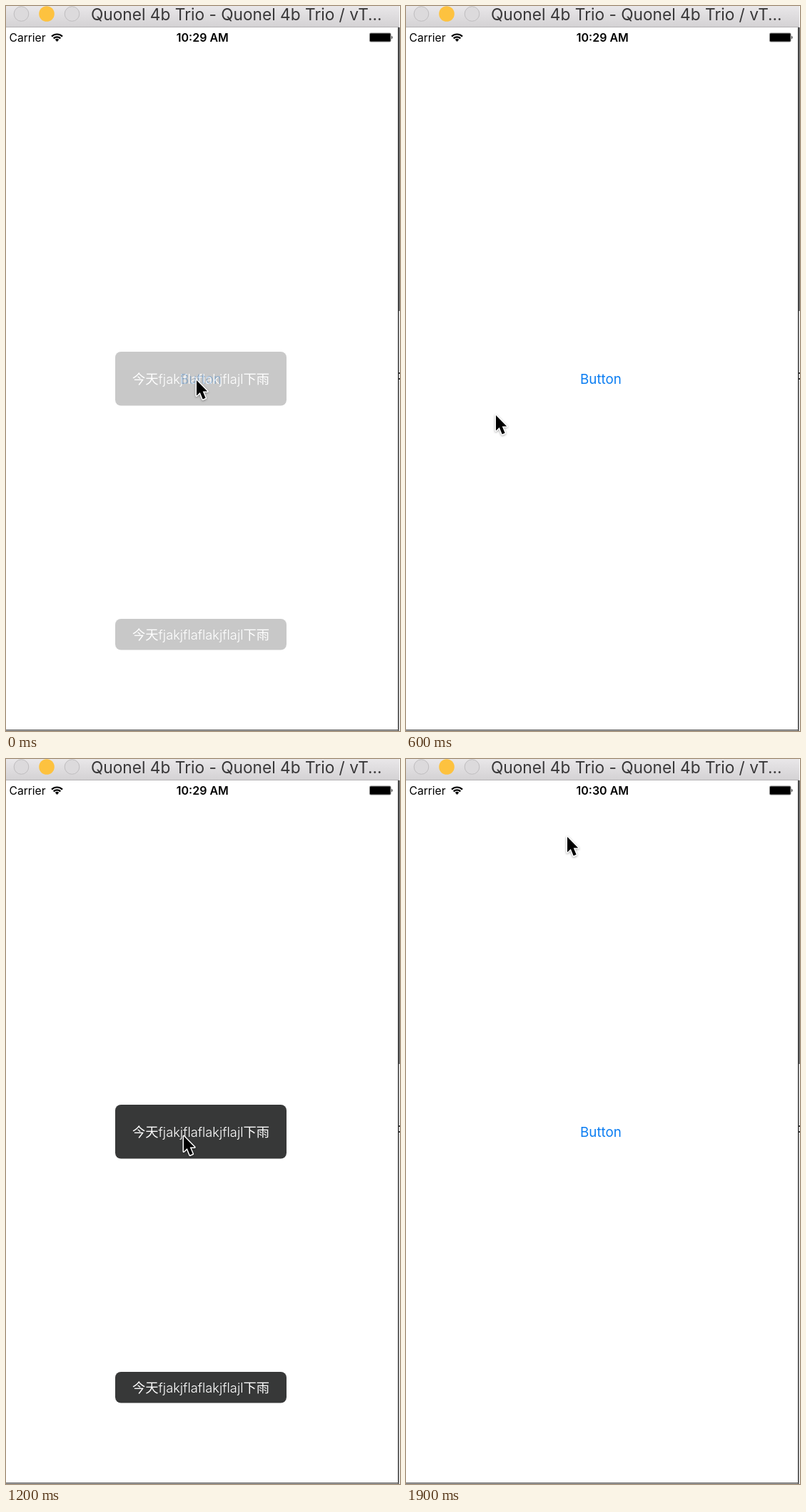
Recreate the animation shown at these times as an HTML page. Size 552 by 1015 pixels, loop 2000 ms.

```html
<!DOCTYPE html>
<html lang="en">
<head>
<meta charset="utf-8">
<style>
  html, body { margin: 0; width: 100%; height: 100%; overflow: hidden; background: #fff; }
  svg { display: block; font-family: Inter, "Noto Sans CJK SC", "Noto Sans CJK", sans-serif; }
  .toast text { fill: #fff; font-size: 18.3px; font-weight: 300; text-anchor: middle; }
  .toast rect { fill: #373838; }
  .light { fill: #dcdadc; stroke: #bfbdbf; }
  #arrow { stroke: #fff; stroke-width: 3; paint-order: stroke; stroke-linejoin: round;
           filter: drop-shadow(0 1.5px 1.5px rgba(0, 0, 0, .35)); }
</style>
</head>
<body>
<svg width="552" height="1015" viewBox="0 0 552 1015">
  <defs>
    <linearGradient id="bar" x2="0" y2="1">
      <stop stop-color="#e9e7e9"/><stop offset="1" stop-color="#d4d2d4"/>
    </linearGradient>
  </defs>

  <!-- window edges -->
  <path fill="#777" d="M550 30h2v397h-2z"/>
  <path fill="#333" d="M549 30h1.5v985h-1.5zM549.5 513h2.5v2h-2.5zM549.5 521h2.5v2h-2.5z"/>
  <path fill="#555" d="M0 1013h550v1.5H0z"/>

  <!-- title bar -->
  <path fill="url(#bar)" d="M0 0h551v29H0z"/>
  <path fill="#b4b2b4" d="M0 29h551v1H0z"/>
  <circle class="light" cx="21.5" cy="11" r="10.3"/>
  <circle cx="57" cy="11" r="10.8" fill="#fdc23f"/>
  <circle class="light" cx="92.5" cy="11" r="10.3"/>
  <text x="119" y="20" font-size="22.7" fill="#383738">Quonel 4b Trio - Quonel 4b Trio / vT...</text>

  <!-- status bar -->
  <text x="4.5" y="50" font-size="15.6">Carrier</text>
  <g fill="none" stroke="#000" stroke-width="2.2">
    <path d="M64 42.6a10.6 10.6 0 0 1 15 0M66.7 45.4a6.8 6.8 0 0 1 9.6 0"/>
  </g>
  <path d="M71.5 50l-2.7-2.9a3.8 3.8 0 0 1 5.4 0z"/>
  <text id="clock" x="275.3" y="50" font-size="16" font-weight="600" text-anchor="middle"></text>
  <rect x="509" y="37.5" width="30.5" height="13" rx="2" fill="#888"/>
  <rect x="510" y="38.5" width="28.5" height="11" rx="1"/>
  <path d="M540.3 41.5q2.4 2.5 0 5z"/>

  <text id="button" x="273" y="529" font-size="18.8" fill="#0a7df2" text-anchor="middle">Button</text>
  <g id="toasts" class="toast">
    <rect x="153" y="484" width="240" height="75.5" rx="8"/>
    <text x="273" y="529">今天fjakjflaflakjflajl下雨</text>
    <rect x="153" y="858" width="240" height="43.5" rx="8"/>
    <text x="273" y="887">今天fjakjflaflakjflajl下雨</text>
  </g>
  <path id="arrow" d="M0 0V21.5L4.8 17L8.7 26.5L12.6 24.8L8.7 15.6H15.2Z"/>
</svg>
<script>
  const LOOP = 2000, STEP = 100;
  const get = id => document.getElementById(id);
  const clock = get('clock'), button = get('button'), toasts = get('toasts'), arrow = get('arrow');

  // pointer stops: time, x, y
  const stops = [
    [0, 267, 524], [100, 267, 524], [400, 126, 573], [700, 126, 573],
    [1000, 249, 528], [1300, 249, 528], [1600, 285, 190], [1900, 226, 109]
  ];

  function pointerAt(t) {
    const i = Math.max(1, stops.findIndex(s => s[0] >= t));
    const [t0, x0, y0] = stops[i - 1], [t1, x1, y1] = stops[i];
    const u = (t - t0) / (t1 - t0), k = u * u * (3 - 2 * u);
    return [x0 + (x1 - x0) * k, y0 + (y1 - y0) * k];
  }

  // each tap starts a quick fade-in; the toast then stays and cuts out
  function toastAt(t) {
    const age = t < 1100 ? t : t - 1100;
    return age >= 600 ? 0 : age < STEP ? 0.27 : 1;
  }

  function draw(now) {
    const t = Math.floor(now % LOOP / STEP) * STEP;
    const alpha = toastAt(t);
    toasts.setAttribute('opacity', alpha);
    button.setAttribute('opacity', alpha === 0 ? 1 : alpha < 1 ? 0.3 : 0);
    arrow.setAttribute('transform', `translate(${pointerAt(t)})`);
    clock.textContent = t < 1400 ? '10:29 AM' : '10:30 AM';
  }

  const start = performance.now();
  function tick() {
    draw(performance.now() - start);
    requestAnimationFrame(tick);
  }
  tick();
</script>
</body>
</html>
```
